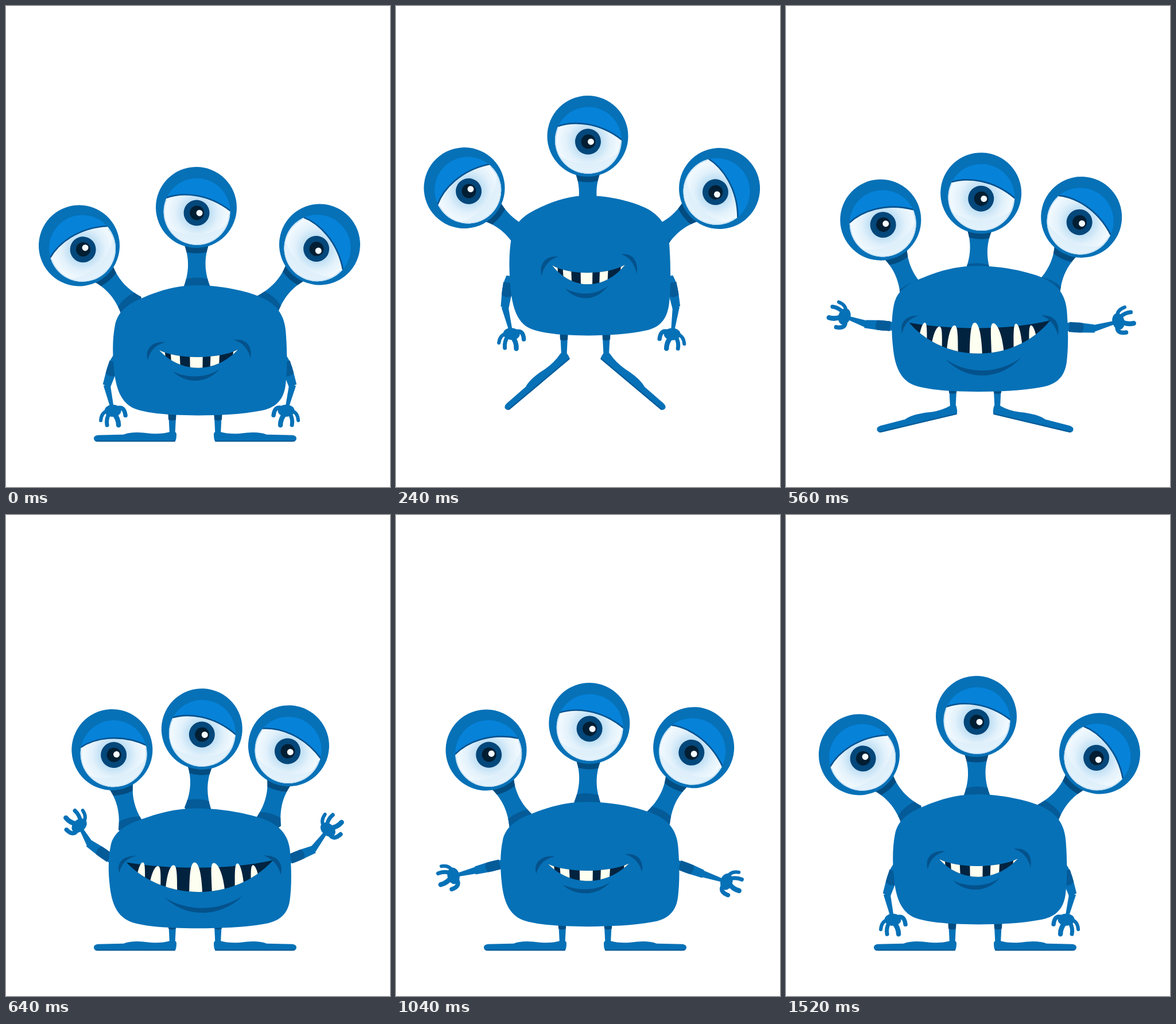
Recreate the animation shown at these times as an HTML page. Size 669x837 px, loop 1.6 s.

```html
<!DOCTYPE html>
<html lang="en">
<head>
<meta charset="utf-8">
<title>Jumping monster</title>
<style>
html, body { margin: 0; width: 100%; height: 100%; overflow: hidden; background: #fff; }
svg { display: block; width: 100vw; height: 100vh; }
.skin { fill: #0671b7; }
.dark { fill: #034c80; }
.shade { fill: #045b98; }
.crease { fill: #04528c; }
.ink { fill: #02233f; }
.tooth { fill: #fdfff0; }
.finger { fill: none; stroke: #0671b7; stroke-linecap: round; }
</style>
</head>
<body>
<svg viewBox="0 0 669 837">
  <defs>
    <radialGradient id="white" gradientUnits="userSpaceOnUse" cx="1" cy="9" r="58">
      <stop offset=".36" stop-color="#bcdef4"/>
      <stop offset=".66" stop-color="#e2f1fb"/>
      <stop offset="1" stop-color="#f5fbff"/>
    </radialGradient>
    <clipPath id="ball"><circle cx="1" cy="7.3" r="58"/></clipPath>
    <clipPath id="neck"><path d="M-24 58C-11 88-14 114-23 138L-17 145H17L23 138C14 114 11 88 24 58Z"/></clipPath>
    <clipPath id="smileClip"><path d="M267 599C300 615 370 615 404 598C365 640 305 640 267 599Z"/></clipPath>
    <clipPath id="grinClip"><path d="M216 500V588C278 663 397 663 459 584V500Z"/></clipPath>

    <g id="stalk">
      <g clip-path="url(#neck)">
        <rect class="skin" x="-40" y="50" width="80" height="100"/>
        <ellipse class="shade" cy="146" rx="42" ry="24"/>
        <circle class="dark" r="80"/>
      </g>
      <circle class="skin" r="70.5"/>
    </g>

    <g id="open">
      <circle cx="1" cy="7.3" r="58" fill="#0682d9"/>
      <g clip-path="url(#ball)">
        <path d="M-75 80V-8L-53-17C-25-27 20-25 60 7L75 20V80Z" fill="url(#white)"/>
        <path d="M-64 22C-30 58 38 56 66 14V80H-64Z" fill="#dceefa" opacity=".65"/>
        <path d="M-52-13.600A57 57 0 1 0 57.700 11" fill="none" stroke="#c6e1f3" stroke-width="2"/>
        <circle cx=".5" cy="9.5" r="22.5" fill="#04477a"/>
        <circle cx="1" cy="9.5" r="12.5" fill="#011e33"/>
        <circle cx="5.5" cy="9.7" r="5.5" fill="#f5fbff"/>
        <path d="M-60-14L-53-17C-25-27 20-25 60 7L66 12" fill="none" stroke="#03528f" stroke-width="2.6"/>
      </g>
    </g>

    <g id="shut">
      <circle cx=".5" cy="7.3" r="57.5" fill="#0a79c8"/>
      <circle cx="0" cy="6" r="55" fill="#0680d6"/>
      <circle cx="7.5" cy="-9.8" r="32.5" fill="#068de9"/>
    </g>

    <g id="hand">
      <ellipse class="skin" rx="14.500" ry="10.500"/>
      <path class="finger" stroke-width="6" d="M-9 0Q-20 3-21 17"/>
      <path class="finger" stroke-width="7" d="M-6 4Q-12 14-10 25"/>
      <path class="finger" stroke-width="8.500" d="M2 5Q10 14 10 25"/>
      <path class="finger" stroke-width="7.500" d="M7-4Q20-9 22 8"/>
    </g>

    <g id="upper">
      <path class="skin" d="M-5-3Q-10 14-8.500 30L-7 52L7 54L8.500 30Q10 14 5-3Z"/>
      <path class="shade" d="M-8.700 9L-8.300 32Q0 37 8.300 32L8.700 9Z"/>
    </g>
  </defs>
  <rect width="669" height="837" fill="#fff"/>
  <g id="stage"></g>
</svg>
<script>
const LOOP = 1600, STEP = 80;
const TIMES = [0, 320, 640, 1520];
const CX = 337.5, BASE = 712.5, STALK = 137;

// Each track holds rest, jump peak and landing; the pose then settles back to rest.
const BODY = { w: [303.5, 273.5, 318.5], top: [486, 278, 510.5], bottom: [712.5, 527, 719.3] };
const LEG = { lift: [-0.7, 185, -0.7], shift: [0, 4, 0], foot: [0, 53.3, 0] };
const SHOULDER = [0, 11, -24];
// Stalks swing about their root on the body.
const EYES = [
  { x: [217.4, 226.2, 218], y: [520.4, 366.1, 541.4], a: [-41, -53, -14] },
  { x: [456.6, 456.3, 457], y: [518.4, 364.3, 534], a: [41, 55, 15] },
  { x: [332.7, 334.8, 334.1], y: [487.5, 322.2, 509.3], a: [-0.5, 0, 3] }
];
const ARMS = [
  { side: 1, up: [18, 5, 125], fore: [-13, -14, 150], hand: [0, 5, 142], len: [46, 50, 37] },
  { side: -1, up: [18, 9, 112], fore: [-14, -6, 143], hand: [0, 0, 140], len: [46, 50, 44] }
];

const stage = document.getElementById('stage');
const $ = id => document.getElementById(id);
const put = (el, value) => el.setAttribute('transform', value);
const show = (el, on) => el.setAttribute('display', on ? 'inline' : 'none');

function smallTooth([l, r]) {
  const lean = x => 333 + (x - 333) * 0.93;
  return `<path class="tooth" d="M${l} 590H${r}L${lean(r)} 640H${lean(l)}Z"/>`;
}

function bigTooth([x, y, w, tip]) {
  const k = w * 0.7;
  return `<path class="tooth" d="M${tip} ${y}C${tip + k} ${y} ${x + w} ${y + 28} ${x + w} 662` +
    `H${x - w}C${x - w} ${y + 28} ${tip - k} ${y} ${tip} ${y}Z"/>`;
}

const smile = `
  <path class="crease" d="M247 616C241 598 254 582 278 585C262 589 251 599 247 616Z"/>
  <path class="crease" d="M397 581C418 578 430 592 426 613C422 597 413 586 397 581Z"/>
  <path class="crease" d="M291 636C313 658 350 658 372 632C348 648 316 648 291 636Z"/>
  <g clip-path="url(#smileClip)">
    <rect class="ink" x="260" y="590" width="150" height="50"/>
    ${[[260, 276], [286, 302], [320, 343], [357, 373], [397, 408]].map(smallTooth).join('')}
  </g>`;

const grin = `
  <path class="crease" d="M204 608C199 588 210 575 233 575.5C217 580 208 589 204 608Z"/>
  <path class="crease" d="M443 575C465 573 477 588 472 611C468 593 459 582 443 575Z"/>
  <path class="crease" d="M279 654C315 694 372 693 409 651C370 681 318 682 279 654Z"/>
  <path class="ink" d="M216 588C290 602 390 602 459 584C397 663 278 663 216 588Z"/>
  <g clip-path="url(#grinClip)">
    ${[[238, 588, 8, 243], [262, 595, 10, 268], [290, 593, 10, 294], [331, 588, 11, 329],
       [369, 589, 11, 361], [404, 590, 8, 400], [431, 593, 8, 426]].map(bigTooth).join('')}
  </g>`;

const leg = `
  <path class="skin" d="M281.5 690H297.500L296 715L294.500 745H285L283.500 715Z"/>
  <path class="dark" d="M281.500 690H297.500L296 719Q289 722 283 719Z"/>
  <g class="foot">
    <path class="skin" d="M297 744Q296 738 287 740Q270 745 250 743Q220 739 205 745L160 746Q153 747 153 751.500Q153 757 160 757.500L294 757.500Q297 755 297 744Z"/>
    <path d="M157 756.300H294" stroke="#045a97" stroke-width="2" stroke-linecap="round"/>
  </g>`;

const arm = `
  <path class="skin fore"/>
  <use class="up" href="#upper"/>
  <use class="hand" href="#hand"/>`;

const eye = '<use href="#stalk"/><use class="open" href="#open"/><use class="shut" href="#shut"/>';

stage.innerHTML =
  ARMS.map(() => `<g class="arm">${arm}</g>`).join('') +
  `<g class="leg">${leg}</g><g class="leg">${leg}</g>` +
  EYES.map(() => `<g class="eye">${eye}</g>`).join('') + `
  <g id="body">
    <path class="skin" d="M333 486C375 486 420 496 445 507C478 522 487 545 488 575C490 605 490 635 487 660C483 690 465 700 445 704C410 711 370 712 335 712.500C290 712 250 710 225 701C200 691 191 665 188 630C185 600 186 575 190 555C195 530 215 517 240 507C270 494 300 486 333 486Z"/>
    <g id="smile">${smile}</g>
    <g id="grin">${grin}</g>
  </g>`;

const all = (cls, root = stage) => [...root.querySelectorAll('.' + cls)];
const one = (cls, root) => root.querySelector('.' + cls);
const eyes = all('eye'), arms = all('arm'), legs = all('leg');

function at(track, t) {
  const i = t < TIMES[1] ? 0 : t < TIMES[2] ? 1 : 2;
  const p = Math.min(1, (t - TIMES[i]) / (TIMES[i + 1] - TIMES[i]));
  const from = track[i], to = track[(i + 1) % 3];
  return from + (to - from) * p;
}

// Angles are counted from straight down, outward positive.
function reach([x, y], angle, len) {
  const a = angle * Math.PI / 180;
  return [x - Math.sin(a) * len, y + Math.cos(a) * len];
}

function drawArm(el, data, t, sx, sy, bottom) {
  const up = at(data.up, t), fore = at(data.fore, t);
  const spread = 146 * (1 + (sx - 1) / 2);
  const shoulder = [-spread, bottom - 101.5 * sy + at(SHOULDER, t)];
  const elbow = reach(shoulder, up, 51);
  const palm = reach(elbow, fore, at(data.len, t));
  const edge = (p, w) => reach(p, fore + 90, w).join(' ');
  put(el, `translate(${CX} 0) scale(${data.side} 1)`);
  put(one('up', el), `translate(${shoulder}) rotate(${up})`);
  put(one('hand', el), `translate(${palm}) rotate(${at(data.hand, t)})`);
  one('fore', el).setAttribute('d',
    `M${edge(elbow, 6)}L${edge(palm, 2.5)}L${edge(palm, -2.5)}L${edge(elbow, -6)}Z`);
}

function draw(t) {
  const bottom = at(BODY.bottom, t);
  const sx = at(BODY.w, t) / 303.5;
  const sy = (bottom - at(BODY.top, t)) / 226.5;
  put($('body'), `translate(${CX} ${bottom}) scale(${sx} ${sy}) translate(${-CX} ${-BASE})`);

  const wide = t >= 320 && t < 720;
  show($('grin'), wide);
  show($('smile'), !wide);

  const blink = t >= 720 && t < 960;
  eyes.forEach((el, i) => {
    const e = EYES[i];
    put(el, `translate(${at(e.x, t)} ${at(e.y, t)}) rotate(${at(e.a, t)}) translate(0 ${-STALK})`);
    show(one('open', el), !blink);
    show(one('shut', el), blink);
  });

  arms.forEach((el, i) => drawArm(el, ARMS[i], t, sx, sy, bottom));

  legs.forEach((el, i) => {
    const flip = i ? 'translate(659 0) scale(-1 1) ' : '';
    put(el, `${flip}translate(${at(LEG.shift, t)} ${-at(LEG.lift, t)})`);
    put(one('foot', el), `rotate(${-at(LEG.foot, t)} 291 748)`);
  });
}

let start = null;
function tick(now) {
  if (start === null) start = now;
  draw(Math.floor(((now - start) % LOOP) / STEP) * STEP);
  requestAnimationFrame(tick);
}
draw(0);
requestAnimationFrame(tick);
</script>
</body>
</html>
```
